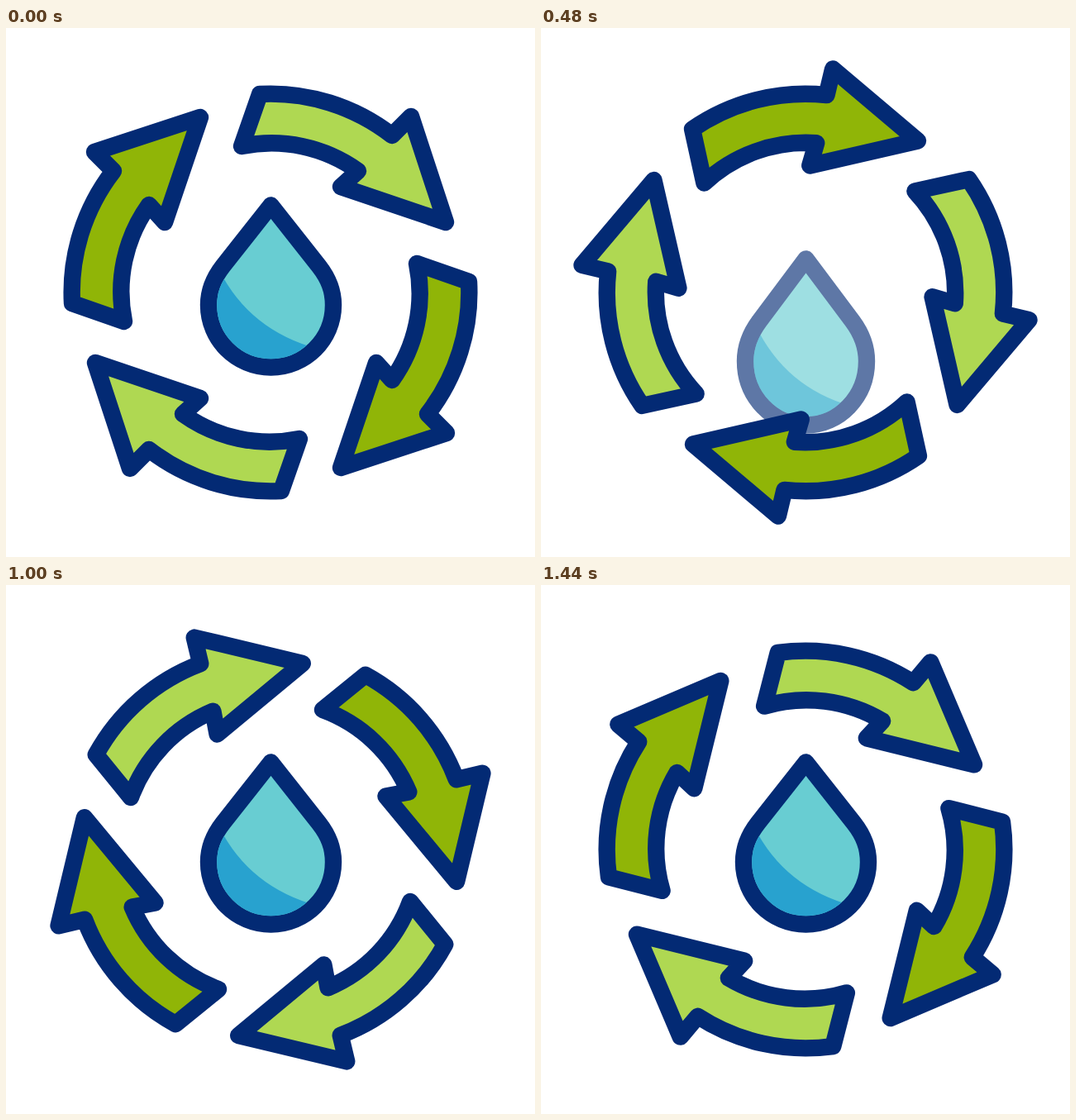
These frames come from a looping animation (640 px wide and 640 px high, 1480 ms). An HTML page:

```html
<!DOCTYPE html>
<html lang="en">
<head>
<meta charset="utf-8">
<title>Water cycle</title>
<style>
  html, body { margin: 0; width: 100%; height: 100%; overflow: hidden; background: #fff; }
  svg { display: block; width: 100vw; height: 100vh; }
  .line { stroke: #032a74; stroke-width: 20.4; stroke-linejoin: round; }
  .light { fill: #afd852; }
  .dark { fill: #90b507; }
  .water { fill: #68cdd2; }
  .shade { fill: #28a2cf; }
</style>
</head>
<body>
<svg viewBox="0 0 640 640">
  <defs>
    <path id="arrow" d="M307 80A240 240 0 0 1 467 130L490 107L532 235L405 192L426 173A180 180 0 0 0 285 143Z"/>
  </defs>
  <g id="drops"></g>
  <g id="ring" class="line">
    <use href="#arrow" class="light"/>
    <use href="#arrow" class="dark" transform="rotate(90 320 320)"/>
    <use href="#arrow" class="light" transform="rotate(180 320 320)"/>
    <use href="#arrow" class="dark" transform="rotate(270 320 320)"/>
  </g>
</svg>
<script>
const LOOP = 1480, STEP = 40;
const CX = 320.5, TOP = 214.5, BOTTOM = 410.5, HALF = 75.5;
const ring = document.getElementById('ring');
const drops = document.getElementById('drops');

const clamp = v => Math.min(1, Math.max(0, v));
const ramp = (t, from, to) => clamp((t - from) / (to - from));

function add(parent, name, attrs = {}) {
  const el = document.createElementNS('http://www.w3.org/2000/svg', name);
  for (const key in attrs) el.setAttribute(key, attrs[key]);
  return parent.appendChild(el);
}

function makeDrop(id) {
  const g = add(drops, 'g');
  // The mask keeps the shade inside the outline.
  const mask = add(g, 'mask', { id, maskUnits: 'userSpaceOnUse', x: 0, y: -100, width: 640, height: 840 });
  const inside = add(mask, 'path', { fill: '#fff', stroke: '#000', 'stroke-width': 20.4, 'stroke-linejoin': 'round' });
  const body = add(g, 'path', { class: 'line water' });
  const shade = add(add(g, 'g', { mask: `url(#${id})` }), 'path', { class: 'shade' });

  return ({ top, bottom, width, alpha }) => {
    g.style.display = alpha > 0 ? '' : 'none';
    const sx = 1 + width / (2 * HALF);
    const sy = 1 + (bottom - top) / (BOTTOM - TOP);
    const p = (x, y) => `${CX + (x - CX) * sx} ${TOP + top + (y - TOP) * sy} `;
    const m = (x, y) => p(2 * CX - x, y);
    const outline =
      'M' + p(CX, TOP) + 'L' + p(262.5, 288) +
      'C' + p(250, 304) + p(245, 318) + p(245, 335) +
      'C' + p(245, 377) + p(279, BOTTOM) + p(CX, BOTTOM) +
      'C' + m(279, BOTTOM) + m(245, 377) + m(245, 335) +
      'C' + m(245, 318) + m(250, 304) + m(262.5, 288) + 'Z';
    inside.setAttribute('d', outline);
    body.setAttribute('d', outline);
    body.setAttribute('opacity', alpha);
    shade.setAttribute('d', 'M' + p(258, 293) + 'Q' + p(295, 366) + p(377, 388) +
      'L' + p(377, 430) + p(230, 430) + p(230, 293) + 'Z');
    shade.setAttribute('opacity', alpha * alpha);
  };
}

const falling = makeDrop('m1');
const arriving = makeDrop('m2');

function draw(t) {
  ring.setAttribute('transform', `rotate(${180 * t / LOOP} 320 320)`);

  const out = ramp(t, 320, 680);
  falling({
    top: 154 * out ** 1.065,
    bottom: 173.4 * out ** 1.119,
    width: -9 * out,
    alpha: 1 - ramp(t, 368, 676)
  });

  const left = 1 - ramp(t, 560, 900);
  arriving({
    top: -161 * left,
    bottom: -140 * left,
    width: -21 * left,
    alpha: ramp(t, 560, 880)
  });
}

const start = performance.now();
function tick() {
  const t = performance.now() - start + 1;
  draw(Math.floor(t / STEP) * STEP % LOOP);
  requestAnimationFrame(tick);
}
tick();
</script>
</body>
</html>
```
